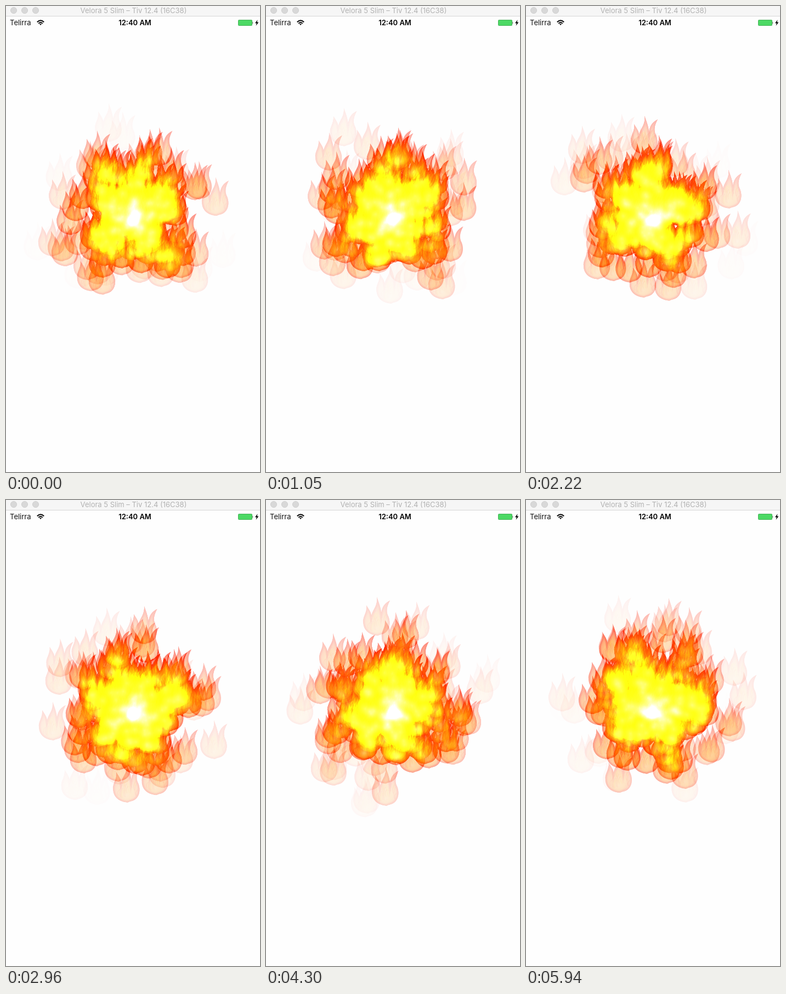
Animation, 463 px wide and 847 px high, one loop 6040 ms. Source, as an HTML page with a canvas:

```html
<!DOCTYPE html>
<html lang="en">
<head>
<meta charset="utf-8">
<title>Fire emitter</title>
<style>
  html, body { margin: 0; width: 100%; height: 100%; overflow: hidden; background: #fefefe; }
  svg, canvas { position: absolute; left: 0; top: 0; width: 463px; height: 847px; }
  text { font-family: Inter, Roboto, "Liberation Sans", sans-serif; font-size: 13px; }
</style>
</head>
<body>
<svg viewBox="0 0 463 847">
  <rect width="463" height="18" fill="#f6f6f6"/>
  <rect y="18" width="463" height="1" fill="#d6d6d6"/>
  <g fill="#d8d8d8" stroke="#cbcbcb" stroke-width=".8">
    <circle cx="14" cy="8" r="5.6"/><circle cx="34" cy="8" r="5.6"/><circle cx="54" cy="8" r="5.6"/>
  </g>
  <text x="232.5" y="13" text-anchor="middle" fill="#b2b2b2">Velora 5 Slim – Tiv 12.4 (16C38)</text>
  <text x="7" y="35" fill="#111">Telirra</text>
  <g fill="none" stroke="#000" stroke-width="1.9">
    <path d="M56.8 29.2Q63 23.4 69.2 29.2M59.3 31.7Q63 28.2 66.7 31.7"/>
    <path d="M61 33L63 35L65 33Q63 31.4 61 33Z" fill="#000" stroke="none"/>
  </g>
  <text x="235" y="35" text-anchor="middle" font-weight="600">12:40 AM</text>
  <rect x="423.5" y="25.5" width="25" height="10" rx="1" fill="#4cd964" stroke="#45b058"/>
  <path d="M449.5 28.5Q451 30.5 449.5 32.5Z" fill="#222"/>
  <path d="M458.6 25L454 31.2H456.8L455.6 36L460.4 29.6H457.5Z" fill="#000"/>
</svg>
<canvas width="463" height="847"></canvas>
<script>
const LOOP = 6040, STEP = 147.8;          // ms
const HELD = [4, 17, 21, 26, 30, 35, 39]; // steps that repeat the picture before them
const CX = 230, CY = 367;                 // emitter
const SPEED = 76, RATE = 80, RANGE = 200; // px/s, flames/s, px
const GOLDEN = Math.PI * (3 - Math.sqrt(5));

let seed = 29;
const rand = () => {
  seed = (seed * 1664525 + 1013904223) % 4294967296;
  return seed / 4294967296;
};

function makeSprite() {
  const c = document.createElement('canvas');
  c.width = 112;
  c.height = 152;
  const g = c.getContext('2d');
  g.scale(2, 2);
  g.translate(28, 38);
  const body = new Path2D('M3 35C-12 34-24 26-24 10C-25 0-17-6-18-20C-13-12-10-8-9-2' +
    'C-6-14 2-18 1-35C5-24 8-16 9-7C11-18 15-24 25-29C18-16 18-8 22 0' +
    'C27 12 24 26 14 31C10 33 6 33 3 35Z');
  g.clip(body);
  const fill = g.createRadialGradient(1, 16, 0, 0, 10, 44);
  fill.addColorStop(0, 'rgba(255,160,14,.72)');
  fill.addColorStop(0.3, 'rgba(255,142,8,.72)');
  fill.addColorStop(0.55, 'rgba(255,85,2,.74)');
  fill.addColorStop(1, 'rgba(255,26,0,.8)');
  g.fillStyle = fill;
  g.fillRect(-28, -38, 56, 76);
  // Streaks inside the tongues
  for (let i = 0; i < 24; i++) {
    const x = -20 + rand() * 40, y = 4 + rand() * 24, h = 10 + rand() * 18;
    g.strokeStyle = i % 2 ? 'rgba(255,165,10,.35)' : 'rgba(255,50,0,.3)';
    g.lineWidth = 0.8 + rand() * 1.6;
    g.beginPath();
    g.moveTo(x, y);
    g.quadraticCurveTo(x - 4, y - h / 2, x + 2, y - h);
    g.stroke();
  }
  // Soft red rim
  g.strokeStyle = 'rgba(250,25,0,.22)';
  for (let w = 2; w <= 8; w += 2) {
    g.lineWidth = w;
    g.stroke(body);
  }
  // Hot spot that adds up to white at the emitter
  const hot = g.createRadialGradient(1, 22, 0, 1, 22, 13);
  hot.addColorStop(0, 'rgba(255,185,110,.75)');
  hot.addColorStop(1, 'rgba(255,165,40,0)');
  g.fillStyle = hot;
  g.fillRect(-28, -38, 56, 76);
  return c;
}

// Evenly turned directions with some scatter; few flames reach the full range
function makeFlames() {
  const count = Math.ceil((RANGE / SPEED + LOOP / 1000) * RATE);
  return Array.from({ length: count }, (_, i) => {
    const angle = i * GOLDEN + (rand() - 0.5) * 1.6;
    return {
      birth: i / RATE - RANGE / SPEED,
      dx: Math.cos(angle),
      dy: Math.sin(angle),
      reach: 105 + 95 * rand() ** 1.5
    };
  });
}

const ctx = document.querySelector('canvas').getContext('2d');
const sprite = makeSprite(), flames = makeFlames();

function draw(t) {
  ctx.clearRect(0, 0, 463, 847);
  ctx.globalCompositeOperation = 'lighter';
  for (const f of flames) {
    const r = (t - f.birth) * SPEED;
    if (r < 0 || r >= f.reach) continue;
    ctx.globalAlpha = (1 - r / RANGE) * Math.min(1, (f.reach - r) / 35);
    ctx.drawImage(sprite, CX + f.dx * r - 28, CY + f.dy * r - 38, 56, 76);
  }
}

const start = performance.now();
let shown = -1;
function tick() {
  let step = Math.floor(((performance.now() - start) % LOOP) / STEP);
  if (HELD.includes(step)) step--;
  if (step !== shown) {
    shown = step;
    draw(step * STEP / 1000);
  }
  requestAnimationFrame(tick);
}
tick();
</script>
</body>
</html>
```
